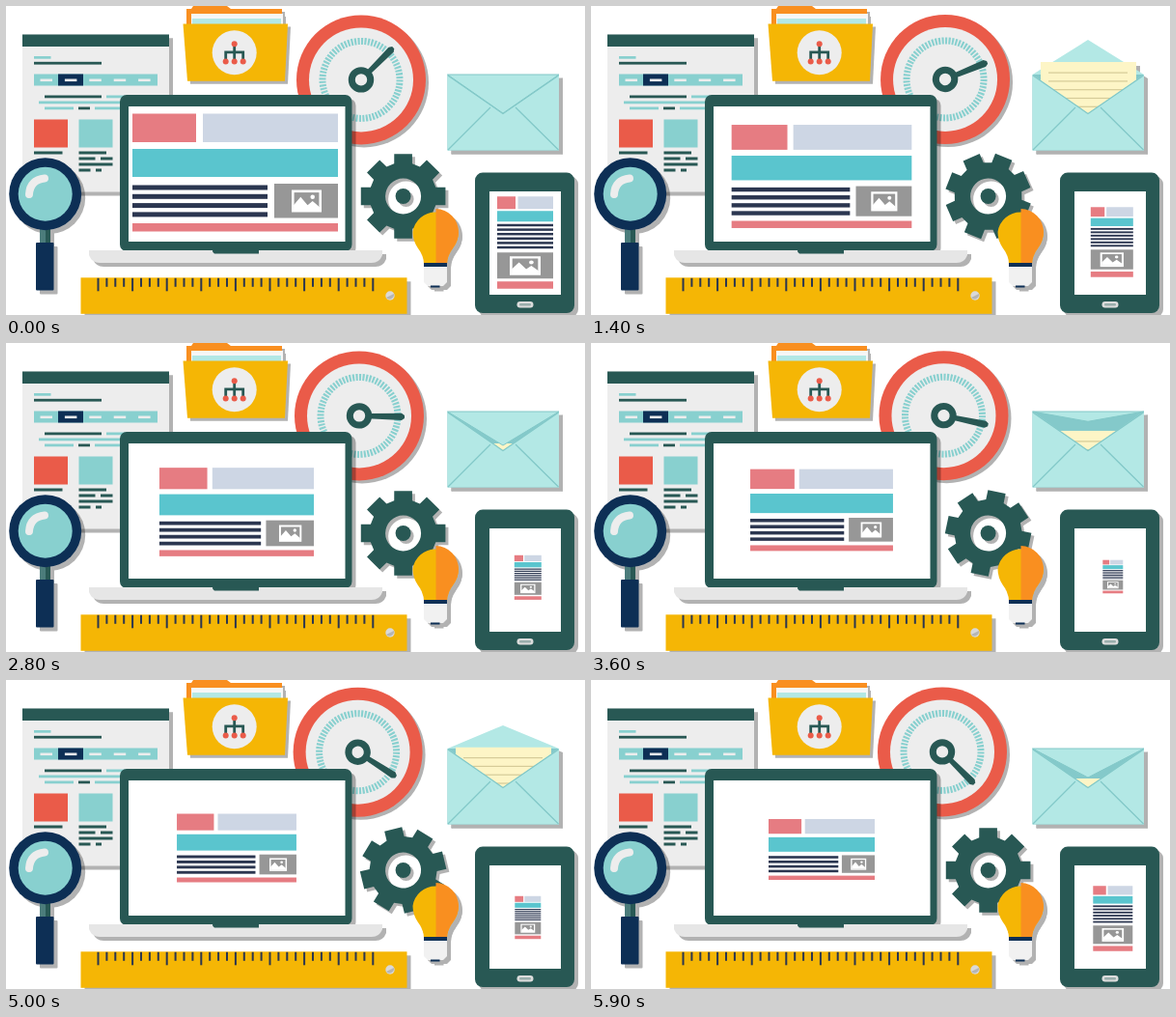
These frames come from a looping animation (600x320 px, 6 s). An HTML page:

```html
<!DOCTYPE html>
<html lang="en">
<head>
<meta charset="utf-8">
<title>Web design desk</title>
<style>
  html, body { margin: 0; width: 100%; height: 100%; overflow: hidden; background: #fff; }
  svg { display: block; width: 600px; height: 320px; }
  .shadow { filter: drop-shadow(4.5px 4px 0 rgba(0, 0, 0, .3)); }
  .low { filter: drop-shadow(3.5px 3.5px 0 rgba(0, 0, 0, .3)); }
</style>
</head>
<body>
<svg id="stage" viewBox="0 0 600 320"></svg>
<script>
const DARK = '#285854', NAVY = '#0d2f55', TEAL = '#88d0cf', RED = '#ea5b49', YELLOW = '#f5b605',
  ORANGE = '#f98f20', LIGHT = '#ededed', MINT = '#b3e8e5', PINK = '#e67c82', CYAN = '#5ac5ce',
  PALE = '#cdd6e4', GREY = '#979797', INK = '#2b3650';

const rect = (x, y, w, h, fill, r = 0) =>
  `<rect x="${x}" y="${y}" width="${w}" height="${h}" rx="${r}" fill="${fill}"/>`;
const circle = (x, y, r, fill) => `<circle cx="${x}" cy="${y}" r="${r}" fill="${fill}"/>`;
const path = (d, fill, extra = '') => `<path d="${d}" fill="${fill}" ${extra}/>`;
const line = (d, color, width, extra = '') =>
  path(d, 'none', `stroke="${color}" stroke-width="${width}" ${extra}`);
const group = (content, attrs = 'class="shadow"') => `<g ${attrs}>${content}</g>`;
const repeat = (n, fn) => Array.from({ length: n }, (_, i) => fn(i)).join('');

const browser = () => group(
  rect(17, 29, 152, 163, LIGHT) + rect(17, 29, 152, 12.5, DARK) +
  rect(29, 51.5, 17.5, 2.7, TEAL) + rect(29, 57.3, 70, 2.8, DARK) +
  rect(29, 70, 128, 12, TEAL) + rect(54, 70, 26, 12, NAVY) +
  repeat(5, i => rect(35.5 + i * 25.4, 75, 12.5, 2.6, LIGHT)) +
  rect(40, 92, 59, 2.8, DARK) + rect(104, 92, 47, 2.8, TEAL) +
  rect(34, 98, 123, 2.8, TEAL) +
  rect(40, 104, 30, 2.8, TEAL) + rect(75, 104, 12, 2.8, DARK) + rect(92, 104, 58, 2.8, TEAL) +
  rect(29, 117, 35, 29, RED) + rect(75.5, 117, 35, 29, TEAL) +
  rect(29, 150, 29.5, 3, DARK) + rect(75.5, 150, 28.5, 3, DARK) +
  rect(75.5, 156, 17, 3, DARK) + rect(98, 156, 12.5, 3, DARK) +
  rect(75.5, 162, 35, 3, DARK) + rect(75.5, 168, 12, 3, DARK) + rect(93, 168, 6, 3, DARK),
  'class="shadow" transform="translate(0 .5)"');

const folder = () => group(
  path('M187 20V3H192L194 0H229L233 3H286V20Z', ORANGE) +
  path('M192 8H287V22H192Z', '#f6f6f6') + path('M193 13H285V22H193Z', MINT) +
  path('M183.5 18.5H292L289 77.7H188Z', YELLOW) +
  circle(236.7, 48.3, 23, LIGHT) +
  line('M236.7 40V55M227.7 55V47.8H245.7V55', DARK, 2.8) +
  circle(236.7, 39.2, 3, RED) + repeat(3, i => circle(227.7 + i * 9, 57.4, 3, RED)), 'class="low"');

const gauge = () => group(
  circle(0, 0, 67, RED) + circle(0, 0, 54, LIGHT) +
  `<circle r="40" fill="none" stroke="${TEAL}" stroke-width="7" pathLength="144" stroke-dasharray="1.2 .8"/>` +
  group(path('M9 -2.6L44 -3.6L47 -1.5V1.5L44 3.6L9 2.6Z', DARK) +
    `<circle r="9.7" fill="${LIGHT}" stroke="${DARK}" stroke-width="7"/>`, 'id="needle"'),
  'id="gauge" class="low"');

const picture = (x, y, w, h) => group(
  rect(0, 0, 30, 22, '#fff') + rect(2.5, 2.5, 25, 17, GREY) +
  path('M2 20V15L9 7L16 15L21 11L28 17V20Z', '#fff') + circle(21, 7, 2.2, '#fff'),
  `transform="translate(${x} ${y}) scale(${w / 30} ${h / 22})"`);

const laptopPage = () =>
  rect(0, 0, 66, 29.5, PINK) + rect(73, 0, 140, 29.5, PALE) + rect(0, 36.5, 213, 29, CYAN) +
  repeat(4, i => rect(0, 74 + i * 9.3, 140, 5, INK)) +
  rect(147, 72.5, 66, 35.5, GREY) + picture(165, 79, 31, 23) + rect(0, 113.5, 213, 8.5, PINK);

const tabletPage = () =>
  rect(0, 0, 19, 13, PINK) + rect(21.5, 0, 36.5, 13, PALE) + rect(0, 15, 58, 11, CYAN) +
  repeat(6, i => rect(0, 28.5 + i * 4.6, 58, 2.5, INK)) +
  rect(0, 58, 58, 27, GREY) + picture(13, 62, 32, 19.5) + rect(0, 88, 58, 7.5, PINK);

const laptop = () => group(
  rect(118, 92, 240.5, 162, DARK, 7) + rect(127, 104, 224.5, 140, '#fff') +
  path('M86 253H390V258Q387 266 379 266H97Q89 266 86 258Z', '#e6e6e6') +
  path('M214 253H262V256.5H216Q214 256 214 253Z', DARK)) +
  group(laptopPage(), 'id="laptopPage"');

const magnifier = () => group(
  rect(35, 230, 11, 17, '#4b7c7b') + rect(41, 230, 5, 17, DARK) +
  rect(31, 245, 18.5, 49.5, NAVY, 1) + circle(40.7, 194.7, 37.5, NAVY) + circle(40.7, 194.7, 28, TEAL) +
  line('M24 195Q25 180 40 178.5', LIGHT, 8, 'stroke-linecap="round"'));

const ruler = () => group(
  rect(77.5, 281.3, 338, 37.5, YELLOW) +
  repeat(33, i => rect(94.5 + i * 8.9, 281.8, 2, i % 4 ? 9 : 13.5, INK)) +
  circle(398, 300, 4.7, '#d9d9d9') + path('M394 302A4.7 4.7 0 0 0 402 298Z', '#b5b5b5'));

// Eight teeth around a rim, with a round hole through the middle.
const gearOutline = () => {
  const corners = [[-15.5, 35], [-12, 44.8], [12, 44.8], [15.5, 35]];
  const points = Array.from({ length: 8 }, (_, k) => corners.map(([offset, r]) => {
    const a = (k * 45 + offset) * Math.PI / 180;
    return `${(r * Math.cos(a)).toFixed(2)} ${(r * Math.sin(a)).toFixed(2)}`;
  })).flat();
  return `M${points.join('L')}ZM18.5 0A18.5 18.5 0 1 0 -18.5 0A18.5 18.5 0 1 0 18.5 0Z`;
};

const gear = () => group(
  group(path(gearOutline(), DARK, 'fill-rule="evenodd"'), 'id="gear"') + circle(0, 0, 8, DARK),
  'class="low" transform="translate(411.6 197)"');

const bulb = () => group(
  path('M433 267Q433 259 427 251Q421.5 243 421.5 234A24 24 0 0 1 469 234Q469 243 463 251Q457 259 457 267Z', YELLOW) +
  path('M445.5 210A24 24 0 0 1 469 234Q469 243 463 251Q457 259 457 267H445.5Z', ORANGE) +
  rect(433, 266, 24, 4, NAVY) + path('M433 270H457V286L453 290H437L433 286Z', '#f1f1f1') +
  rect(440, 289.5, 9.5, 2, NAVY));

const envelope = () => group(
  rect(457.5, 71, 115.5, 78.5, '#84c9ca') +
  path('', MINT, 'id="flapUp"') +
  group(rect(466, 0, 99, 95, '#fdf5c6') + repeat(6, i => rect(474, 10.5 + i * 8.8, 82, 1.2, '#d5cb98')),
    'id="letter" clip-path="url(#pocketLimit)"') +
  path('M457.5 71L515 111.5L573 71V149.5H457.5Z', MINT) +
  line('M458 149L502 105M572.5 149L528 105M458 72L515 111.5L572.5 72', '#82c8c8', 1.3) +
  path('', MINT, 'id="flapDown" stroke="#82c8c8"'));

const tablet = () => group(
  rect(486, 172.6, 103, 145.4, DARK, 8) + rect(501, 192, 74, 107, '#fff') +
  rect(529.5, 306, 17, 6.5, '#dcdcdc', 3.2) + rect(532, 308, 12, 2.5, '#9aaeac', 1.2)) +
  group(tabletPage(), 'id="tabletPage"');

document.getElementById('stage').innerHTML =
  '<clipPath id="pocketLimit"><rect id="letterClip" x="457" width="117"/></clipPath>' +
  [browser, folder, gauge, laptop, magnifier, ruler, gear, bulb, envelope, tablet].map(draw => draw()).join('');

const el = id => document.getElementById(id);
const place = (id, transform) => el(id).setAttribute('transform', transform);

// Linear interpolation through [position, value] keys.
function track(keys, x) {
  const i = Math.max(1, keys.findIndex(([pos]) => pos >= x));
  const [x0, y0] = keys[i - 1], [x1, y1] = keys[i];
  return y0 + (y1 - y0) * (x - x0) / (x1 - x0);
}

const LOOP = 6000, LAST = 46, HALF_CYCLE = 11.75;
const HOLDS = [5, 9, 13, 17, 21, 29, 33, 37, 45, 47, 49, 53, 57];
const SWING = [[0, 0], [17, .395], [29, .632], [39, .865], [46, 1]];
const LAPTOP_Y = [[0, 172.5], [5, 176], [17, 177], [29, 173], [39, 174], [46, 175.5]];
const TABLET_W = [[0, 58], [11, 44], [17, 35], [29, 21], [33, 16], [39, 27], [46, 41]];
const TABLET_X = [[0, 538], [17, 540.8], [46, 540.8]];
const TABLET_Y = [[0, 245], [11, 244.5], [29, 242], [39, 246], [46, 247]];
const FLAP_TIP = [[0, 111], [1, 101], [5.25, 87], [6.5, 58.5], [8, 47], [11, 35], [12, 33]];
const LETTER_TOP = [[0, 106], [1, 102], [5.25, 94], [6.5, 78], [8, 69.5], [11, 58], [12, 55]];

function scalePage(id, scale, cx, cy, w, h) {
  place(id, `translate(${cx} ${cy}) scale(${scale}) translate(${-w / 2} ${-h / 2})`);
}

function poseEnvelope(step) {
  const phase = step % (2 * HALF_CYCLE);
  const open = HALF_CYCLE - Math.abs(phase - HALF_CYCLE);
  const tip = track(FLAP_TIP, open), top = track(LETTER_TOP, open);
  const flap = `M457.5 71L515 ${tip}L573 71Z`;
  el('flapUp').setAttribute('d', tip < 71 ? flap : '');
  el('flapDown').setAttribute('d', tip < 71 ? '' : flap);
  place('letter', `translate(0 ${top})`);
  el('letterClip').setAttribute('height', 148 - top);
}

function render(now) {
  const tick = Math.floor(now % LOOP / 100);
  const step = tick - HOLDS.filter(hold => hold <= tick).length;
  const progress = step / LAST, swing = track(SWING, step);

  place('gauge', `translate(${368 - 4 * progress} ${76.4 - 2 * progress})`);
  place('needle', `rotate(${-45 + 90 * swing})`);
  place('gear', `rotate(${90 * progress})`);
  scalePage('laptopPage', 1 - 103 / 213 * swing, 237.5 + 1.5 * Math.min(1, step / 5), track(LAPTOP_Y, step), 213, 122);
  scalePage('tabletPage', track(TABLET_W, step) / 58, track(TABLET_X, step), track(TABLET_Y, step), 58, 95.5);
  poseEnvelope(step);
}

const start = performance.now();
function loop() {
  render(performance.now() - start);
  requestAnimationFrame(loop);
}
loop();
</script>
</body>
</html>
```
